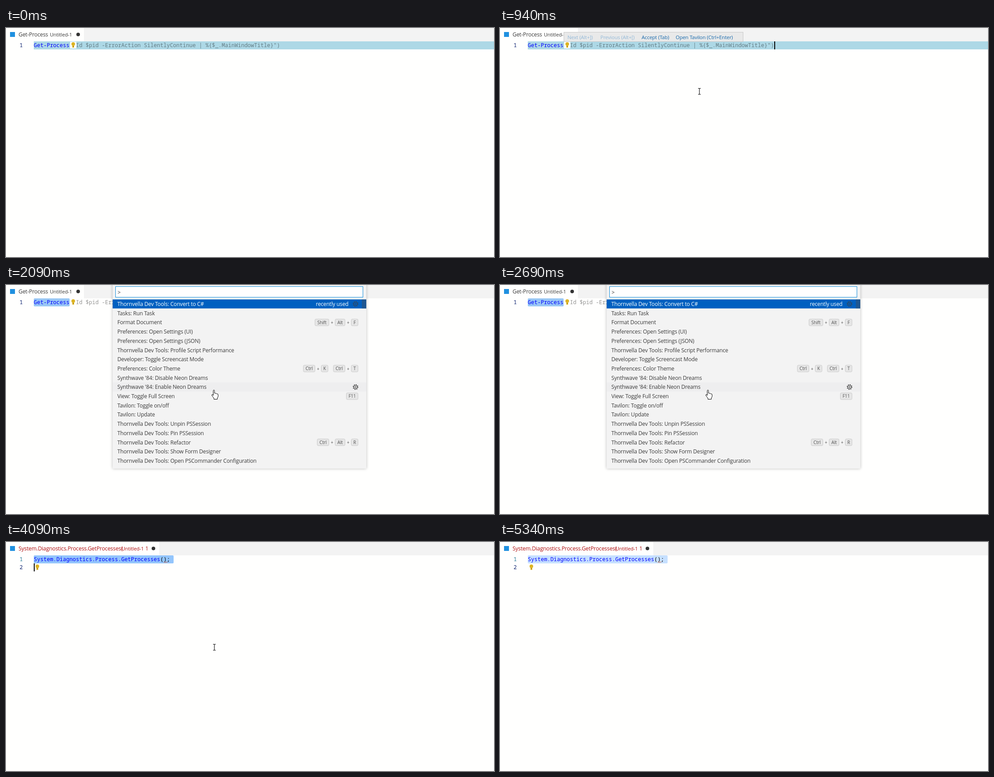
These frames come from a looping animation (1089x514 px, 5430 ms). An HTML page:

```html
<!DOCTYPE html>
<html lang="en">
<head>
<meta charset="utf-8">
<title>Convert command to C#</title>
<style>
  html, body { margin: 0; width: 100%; height: 100%; overflow: hidden; background: #fffffe; }
  svg { display: block; }
  text { font: 12px 'Open Sans', sans-serif; letter-spacing: -.014em; fill: #3b3b3b; white-space: pre; }
  .title { font-size: 12.2px; }
  .small { font-size: 11px; }
  .action { font-size: 11.3px; fill: #1769ac; }
  .off { fill: #93b9d8; }
  .key { font-size: 10px; text-anchor: middle; fill: #555; }
  .code { font: 12.06px 'Noto Sans Mono', monospace; letter-spacing: 0; fill: #000; }
  .blue { fill: #00f; }
  .ghost { fill-opacity: .42; }
  .num { text-anchor: end; fill: #0b216f; }
  .dim { fill: #237893; }
  .error text { fill: #b01011; }
  .white { fill: #fff; }
  .palette { filter: drop-shadow(0 0 3px #0004); }
</style>
</head>
<body>
<svg id="stage" width="1089" height="514" viewBox="0 0 1089 514"></svg>
<script>
const LOOP = 5430;
const stage = document.getElementById('stage');

const rect = (x, y, w, h, fill, more = '') =>
  `<rect x="${x}" y="${y}" width="${w}" height="${h}" fill="${fill}" ${more}/>`;
const text = (x, y, str, cls = '') => `<text x="${x}" y="${y}" class="${cls}">${str}</text>`;
// Content shown only during the given "start-end" spans (ms)
const during = (spans, content, cls = '') => `<g data-on="${spans}" class="${cls}">${content}</g>`;
const caret = (x, y, spans) => during(spans, rect(x, y, 2, 18, '#000'));

const tab = (width, title, fileX, dotX, badge = '') =>
  rect(0, 0, width, 30, '#fffffe') + rect(9, 9, 11, 11, '#2090e0') +
  text(28, 18.8, title, 'title') + text(fileX, 18.8, 'Untitled-1', 'small') + badge +
  `<circle cx="${dotX}" cy="14.5" r="4" fill="#333"/>`;

const bulb = (x, y) => rect(x - 7, y - 5, 14, 15, '#fffffe') +
  `<g transform="translate(${x} ${y})"><circle r="4" fill="#ddb424"/>` +
  rect(-2, 3, 4, 5, '#ddb424') + rect(-1, 5, 2, 1, '#8b6c10') + '</g>';

const gear = (y, color) => `<g transform="translate(780 ${y})" fill="none" stroke="${color}">
  <circle r="5.2" stroke-width="2" stroke-dasharray="2 2.084"/><circle r="4"/><circle r="1.4"/></g>`;

// Key badges, laid out from the right edge; chords are separated by a space
function keys(shortcut, y) {
  let right = 786, out = '';
  for (const chord of shortcut.split(' ').reverse()) {
    chord.split('+').reverse().forEach((key, i) => {
      if (i) {
        out += text(right - 6.5, y + 4, '+', 'key');
        right -= 13;
      }
      const w = { Shift: 32, Ctrl: 27, Alt: 23, F11: 27 }[key] || 16;
      out += rect(right - w + .5, y - 7.5, w - 1, 15, '#e6e6e6', 'rx="2.5" stroke="#cbcbcb"') +
        text(right - w / 2, y + 3.6, key, 'key');
      right -= w;
    });
    right -= 11;
  }
  return out;
}

const vendor = 'Thornvella Dev Tools: ';
const commands = [
  [vendor + 'Convert to C#'],
  ['Tasks: Run Task'],
  ['Format Document', 'Shift+Alt+F'],
  ['Preferences: Open Settings (UI)'],
  ['Preferences: Open Settings (JSON)'],
  [vendor + 'Profile Script Performance'],
  ['Developer: Toggle Screencast Mode'],
  ['Preferences: Color Theme', 'Ctrl+K Ctrl+T'],
  ["Synthwave '84: Disable Neon Dreams"],
  ["Synthwave '84: Enable Neon Dreams"],
  ['View: Toggle Full Screen', 'F11'],
  ['Tavilon: Toggle on/off'],
  ['Tavilon: Update'],
  [vendor + 'Unpin PSSession'],
  [vendor + 'Pin PSSession'],
  [vendor + 'Refactor', 'Ctrl+Alt+R'],
  [vendor + 'Show Form Designer'],
  [vendor + 'Open PSCommander Configuration'],
];

const rows = commands.map(([label, shortcut], i) => {
  const y = 42.6 + i * 20.7;
  return text(248.5, y + 4.4, label, i ? '' : 'white') + (shortcut ? keys(shortcut, y) : '');
}).join('');

const palette = `<g class="palette">${rect(238, -4, 566, 416, '#f3f3f3')}</g>` +
  rect(244.5, 3.5, 552, 24, '#fff', 'stroke="#0c8ad8"') + text(249, 20.5, '&gt;') +
  rect(238, 32.4, 566, 20.2, '#0060c0') + rect(794, 32.4, 10, 20.2, '#3c4c64', 'opacity=".5"') +
  rect(238, 218.6, 566, 20.7, '#eeeeef') + rows +
  text(691.5, 47, 'recently used', 'white') + gear(42.5, '#34465c') + gear(229, '#444');

const toolbar = rect(142.5, 9.5, 400, 21, '#e9e9e9', 'stroke="#c8c8c8"');
const actions = text(150.5, 25.4, 'Next (Alt+])', 'action off') +
  text(224, 25.4, 'Previous (Alt+[)', 'action off') +
  text(316, 25.4, 'Accept (Tab)', 'action') +
  text(392, 25.4, 'Open Tavilon (Ctrl+Enter)', 'action');

const statement = 'System.Diagnostics.Process.GetProcesses';
const newTitle = statement + '(';

stage.innerHTML =
  rect(0, 0, 1089, 514, '#fffffe') + rect(0, 0, 1089, 30, '#f3f3f3') +
  during('0-3080', tab(174, 'Get-Process', 98, 161)) +
  during('3080-3850', tab(334, newTitle, 258, 321)) +
  during('3850-5430', tab(342, newTitle, 258, 329, text(311, 18.8, '1')), 'error') +

  during('0-1000', rect(62, 30, 1027, 18, '#add8e6')) +
  during('1000-2000 3010-3080', rect(62, 30, 80, 18, '#74ade8', 'rx="2"')) +
  during('2000-3010', rect(62, 30, 80, 18, '#99c7f5', 'rx="2"')) +
  during('3080-5340', rect(62, 30, 312, 18, '#93c5fc', 'rx="2"')) +
  during('5340-5430', rect(62, 30, 312, 18, '#c6e0ff', 'rx="2"')) +

  during('0-3080', text(37.5, 43.4, '1', 'code num') + text(62, 43.4, 'Get-Process', 'code blue') +
    text(148.8, 43.4, '-Id $pid -ErrorAction SilentlyContinue | %{$_.MainWindowTitle}")', 'code ghost') +
    bulb(150, 36)) +
  during('3080-5430', text(37.5, 43.4, '1', 'code num dim') + text(37.5, 61.4, '2', 'code num') +
    text(344.2, 43.4, '();', 'code')) +
  during('3080-3390', text(62, 43.4, statement, 'code')) +
  during('3390-5430', text(62, 43.4, statement, 'code blue')) +
  during('3850-5430', '<path d="M352 46l2-1.5 2 2 2-2 2 1.5" fill="none" stroke="#e5501a"/>') +
  during('3940-5430', bulb(70, 54.5)) +

  during('390-1000 1400-2000', toolbar) +
  during('1400-1460', `<g opacity=".4">${actions}</g>`) +
  during('390-1000 1460-2000', actions) +

  caret(612, 30, '860-1000') +
  caret(141, 30, '1000-1460 3010-3080') +
  caret(62, 48, '3080-3540 4090-4590 5020-5340') +

  during('2000-3010', palette) +
  during('2160-2690', rect(256, 8, 1, 16, '#000')) +
  during('2000-3010', `<path transform="translate(457.5 235)" fill="#fff" stroke="#000" stroke-linejoin="round"
    d="M5 13V2.5Q5 .8 6.4 .8T7.8 2.5V8Q9.5 6.8 10.6 8.6 12.2 7.6 13.2 9.4 15.8 8.8 15.8 11.2V15.5L14 19V21.5H6.5V19L2.2 13.5Q.8 11.4 2.4 10.9T5 13Z"/>`) +
  during('70-2000 3010-5020', `<path id="beam" fill="none" stroke="#000" stroke-width="1.1"
    d="M-3-6.5H-1L0-6 1-6.5H3M0-6V6.5M-3 7H-1L0 6.5 1 7H3"/>`);

const beam = document.getElementById('beam');
const timed = [...stage.querySelectorAll('[data-on]')].map(node => ({
  node, spans: node.dataset.on.split(' ').map(s => s.split('-').map(Number)),
}));

// Pointer moves: start, end, number of discrete steps, from, to
const moves = [
  [70, 550, 6, [970, 484], [445, 142]],
  [1000, 1400, 5, [445, 142], [465, 236]],
  [4264, 4950, 9, [465, 236], [1065, 490]],
];
const ease = u => u * (1 + 3 * u - 2 * u * u) / 2;

function pointer(t) {
  const [start, end, steps, from, to] = moves.filter(m => t >= m[0]).pop() || moves[0];
  const u = Math.min(1, Math.max(0, Math.floor((t - start) / (end - start) * steps) / steps));
  return from.map((v, i) => Math.round(v + (to[i] - v) * ease(u)));
}

function draw(now) {
  const t = now % LOOP;
  for (const { node, spans } of timed) {
    node.style.display = spans.some(([a, b]) => t >= a && t < b) ? '' : 'none';
  }
  beam.setAttribute('transform', `translate(${pointer(t)})`);
}

let origin;
function tick(now) {
  origin ??= now;
  draw(now - origin);
  requestAnimationFrame(tick);
}
draw(0);
requestAnimationFrame(tick);
</script>
</body>
</html>
```
